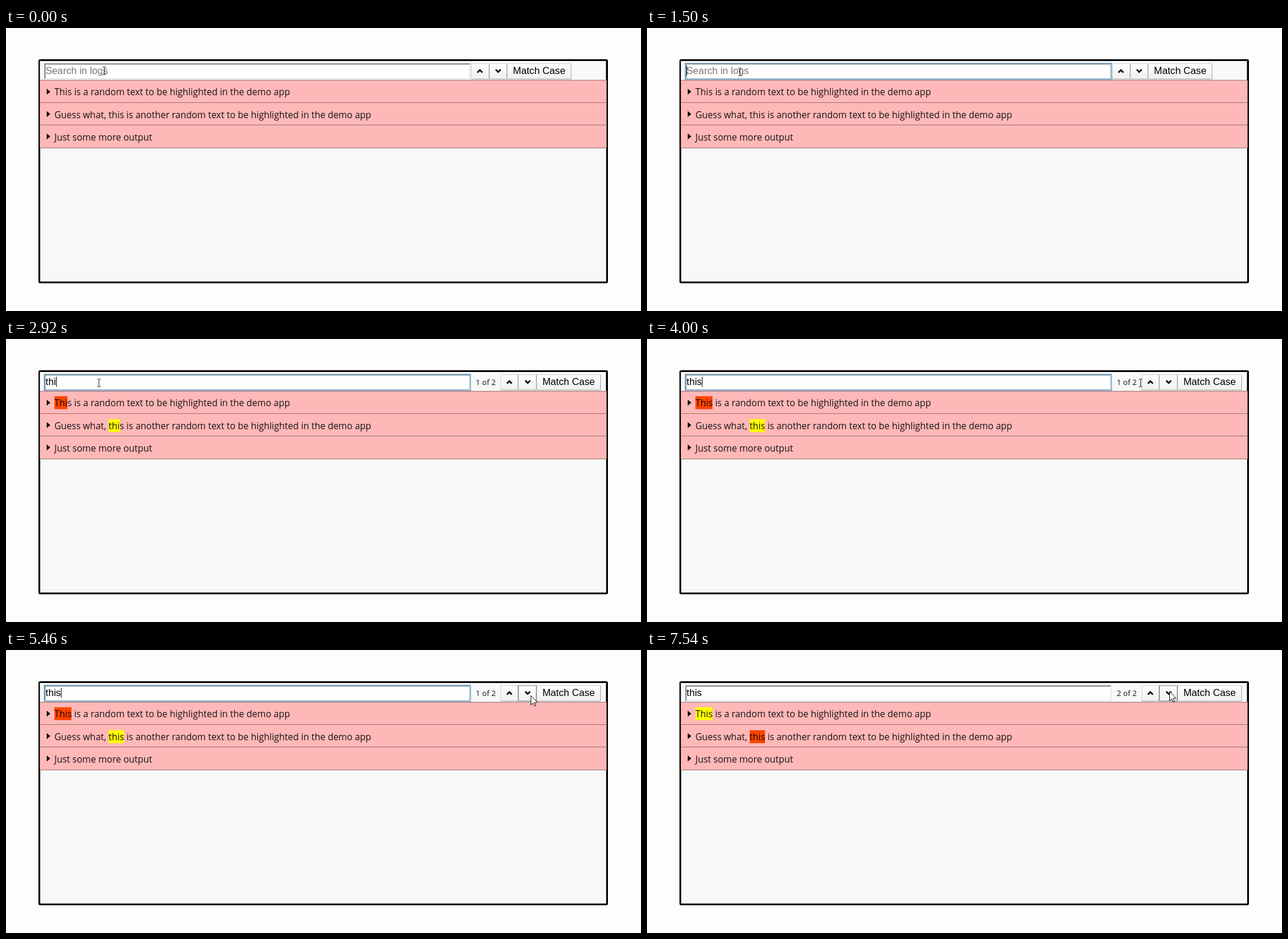
Animation, 1076 px wide and 480 px high, one loop 8 s. Source, as an HTML page:

```html
<!DOCTYPE html>
<html lang="en">
<head>
<meta charset="utf-8">
<title>Log search</title>
<style>
  html, body { margin: 0; width: 100%; height: 100%; overflow: hidden; background: #fdfdfd; }
  #stage { position: relative; width: 1076px; height: 480px; overflow: hidden; cursor: default; }
  #stage > div, #stage > svg { position: absolute; box-sizing: border-box; }
  #frame { left: 55px; top: 53px; width: 965px; height: 380px; border: 3px solid #000; border-radius: 3px; background: #f8f8f8; }
  #bar { left: 57px; top: 55px; width: 960px; height: 34px; border: solid #999; border-width: 0 1px; }
  #field, .button { font-family: "Liberation Sans", Arial, sans-serif; font-size: 16.67px; color: #000; }
  #field {
    left: 65px; top: 60px; width: 722px; height: 27px; line-height: 21px;
    border: 2px solid; border-color: #858585 #e6e6e6 #e6e6e6 #858585;
    background: #fff; white-space: pre;
  }
  #field.focus { border-color: #7d98a8 #a9c3d4 #a9c3d4 #7d98a8; box-shadow: 0 0 0 1px #8ab0cc; }
  #caret { display: inline-block; width: 1px; height: 17px; margin-right: -1px; vertical-align: -3px; background: #000; }
  #hint { color: #757575; }
  #tools { left: 788px; top: 60px; height: 27px; display: flex; }
  #count { padding: 0 8px; line-height: 26px; color: #111; font-family: "Open Sans", "Noto Sans", sans-serif; font-size: 13px; white-space: pre; }
  #count:empty { display: none; }
  .button {
    box-sizing: border-box; flex: none; width: 30.5px; height: 27px; line-height: 23px; text-align: center;
    border: 1px solid; border-color: #d0d0d0 #a4a4a4 #a4a4a4 #d0d0d0; border-radius: 1px;
    background: linear-gradient(#fcfcfc, #f1f1f1);
  }
  .button.wide { width: 109px; }
  .button.over { border-color: #8a8a8a #6e6e6e #6e6e6e #8a8a8a; }
  .button svg { display: block; margin: 0 auto; }
  .row {
    left: 57px; width: 961px; border: 1px solid #9c7272; padding-left: 24px;
    background: #ffb8b8; color: rgba(0, 0, 0, .9); white-space: pre;
    font-family: "Open Sans", "Noto Sans", sans-serif; font-size: 15.5px;
  }
  .row::before { content: ""; position: absolute; left: 11px; top: 14px; border: solid transparent; border-width: 5px 0 5px 6px; border-left-color: #000; }
  mark { background: #ff0; color: inherit; }
  mark.active { background: #ff4500; }
  #pointer { left: 0; top: 0; width: 24px; height: 24px; overflow: visible; }
</style>
</head>
<body>
<div id="stage">
  <div id="frame"></div>
  <div id="bar"></div>
  <div id="field"><span id="typed"></span><i id="caret"></i><span id="hint">Search in logs</span></div>
  <div id="tools">
    <span id="count"></span>
    <div class="button"><svg width="14" height="25"><path d="M2.8 14.5 7 10.3l4.2 4.2" fill="none" stroke="#000" stroke-width="2.5"/></svg></div>
    <div class="button"><svg width="14" height="25"><path d="M2.8 9.5 7 13.7l4.2-4.2" fill="none" stroke="#000" stroke-width="2.5"/></svg></div>
    <div class="button wide">Match Case</div>
  </div>
  <svg id="pointer">
    <path id="beam" d="M-3-6.5h2.5l.5.5.5-.5H3M0-6V6M-3 6.5h2.5L0 6l.5.5H3" fill="none" stroke="#222"/>
    <path id="arrow" d="M.5.5v15.6l3.6-3.4 2.4 5.5 2.3-1-2.3-5.3h5z" fill="#fff" stroke="#111"/>
  </svg>
</div>
<script>
const LOOP = 8000;
const $ = id => document.getElementById(id);

const lines = [
  { text: 'This is a random text to be highlighted in the demo app', top: 88, height: 39, leading: 38 },
  { text: 'Guess what, this is another random text to be highlighted in the demo app', top: 126, height: 39, leading: 40 },
  { text: 'Just some more output', top: 164, height: 40, leading: 40 }
];

// time, query, active match, field has focus
const states = [
  [0, '', 0, false],
  [1250, '', 0, true],
  [2250, 't', 0, true],
  [2670, 'th', 0, true],
  [2790, 'thi', 0, true],
  [2960, 'this', 0, true],
  [5500, 'this', 1, false],
  [6460, 'this', 0, false],
  [7460, 'this', 1, false]
];

// time, x, y
const path = [
  [0, 166, 72], [90, 166, 72], [710, 157, 74], [3520, 157, 74],
  [4000, 836, 74], [4250, 862, 77], [4340, 862, 77], [5130, 889, 77],
  [5560, 889, 77], [6000, 854, 78], [6580, 854, 78], [7000, 885, 70], [LOOP, 885, 70]
];

// spans in which the caret shows
const caretOn = [[1250, 1750], [2250, 4670], [5170, 5500]];

const rows = lines.map(({ top, height, leading }) => {
  const row = document.createElement('div');
  row.className = 'row';
  row.style.cssText = `top:${top}px;height:${height}px;line-height:${leading}px`;
  $('stage').insertBefore(row, $('pointer'));
  return row;
});
const buttons = [...document.querySelectorAll('.button')];

function highlight(query, active) {
  let found = 0;
  rows.forEach((row, i) => {
    const { text } = lines[i];
    row.innerHTML = query
      ? text.replace(new RegExp(query, 'gi'), hit => `<mark${found++ === active ? ' class="active"' : ''}>${hit}</mark>`)
      : text;
  });
  return found;
}

function show([, query, active, focus]) {
  const found = highlight(query, active);
  $('typed').textContent = query;
  $('hint').hidden = query !== '';
  $('count').textContent = query ? `${active + 1} of ${found}` : '';
  $('field').classList.toggle('focus', focus);
}

function pointerAt(t) {
  const next = Math.max(1, path.findIndex(p => p[0] > t));
  const [t0, x0, y0] = path[next - 1];
  const [t1, x1, y1] = path[next];
  const k = (t - t0) / (t1 - t0);
  const ease = k * k * (3 - 2 * k);
  return [x0 + (x1 - x0) * ease, y0 + (y1 - y0) * ease].map(Math.round);
}

function placePointer([x, y]) {
  let over = false;
  for (const button of buttons) {
    const box = button.getBoundingClientRect();
    const inside = x >= box.left && x < box.right && y >= box.top && y < box.bottom;
    button.classList.toggle('over', inside);
    over = over || inside;
  }
  $('arrow').style.display = over ? '' : 'none';
  $('beam').style.display = over ? 'none' : '';
  const shift = over ? 0 : 0.5;
  $('pointer').style.transform = `translate(${x + shift}px, ${y + shift}px)`;
}

let current;
function draw(now) {
  const t = now % LOOP;
  const state = states.filter(s => s[0] <= t).pop();
  if (state !== current) show(current = state);
  $('caret').style.visibility = caretOn.some(([a, b]) => t >= a && t < b) ? 'visible' : 'hidden';
  placePointer(pointerAt(t));
}

const start = performance.now();
function tick() {
  draw(performance.now() - start);
  requestAnimationFrame(tick);
}
tick();
</script>
</body>
</html>
```
